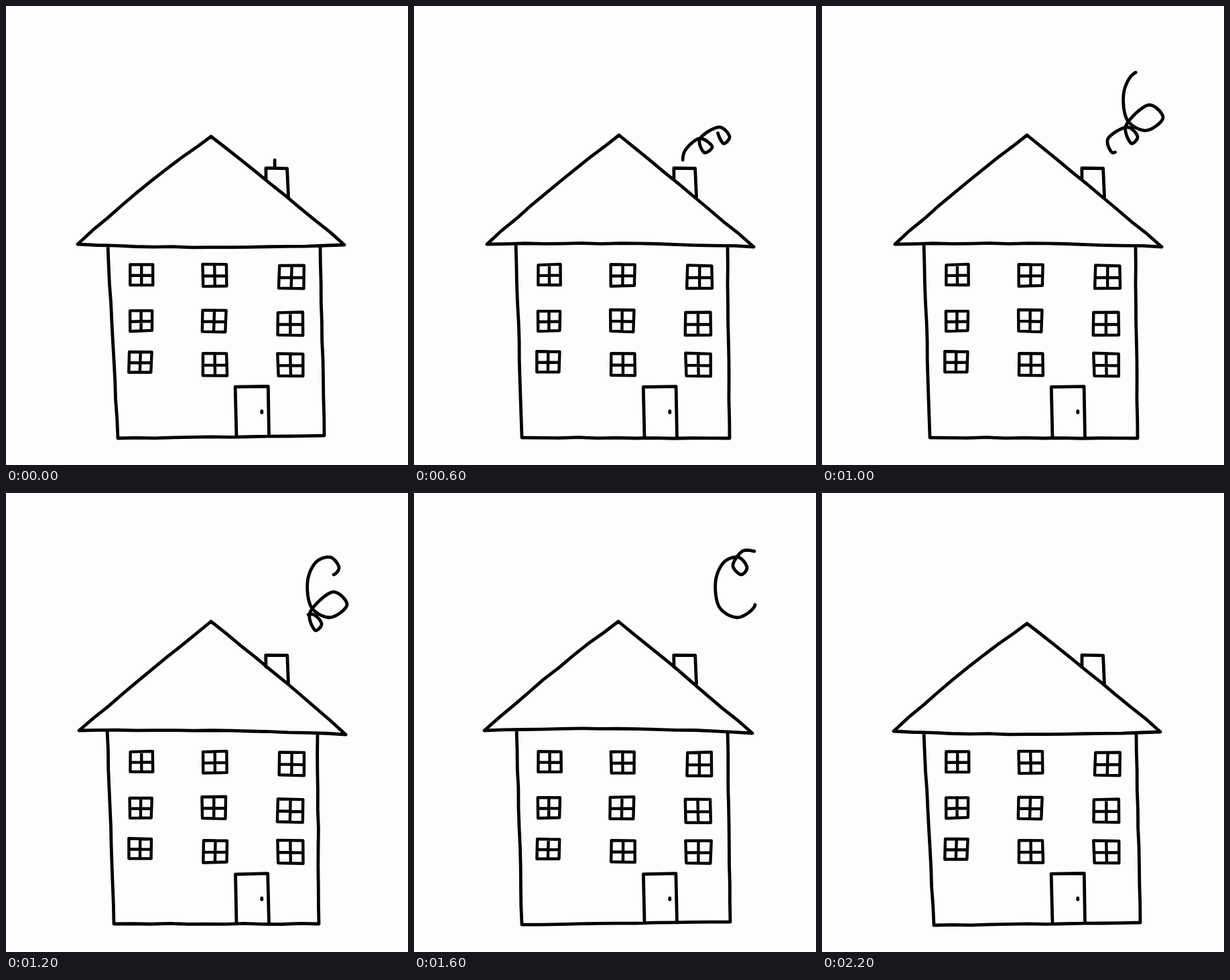
An HTML page that plays this animation: 600x686 px, repeating every 2300 ms.

```html
<!DOCTYPE html>
<html lang="en">
<head>
<meta charset="utf-8">
<title>House with smoke</title>
<style>
  html, body { margin: 0; width: 100%; height: 100%; overflow: hidden; background: #fefcff; }
  svg { display: block; width: 100%; height: 100%; }
  path { fill: none; stroke: #000; stroke-width: 4.8; stroke-linecap: round; stroke-linejoin: round; }
  #windows { stroke-width: 4.4; }
</style>
</head>
<body>
<svg viewBox="0 0 600 686">
  <path id="house"/>
  <path id="windows"/>
  <path id="smoke"/>
</svg>
<script>
// Key points of the four drawings that make the outline boil.
// bows: how far the left slope, right slope and eaves sag at their middle.
const poses = [
  { apex: [306, 195], eaves: [[107, 356], [505, 357]], top: [152, 469], base: [[167, 646], [475, 642]], bows: [-6, -2, 4] },
  { apex: [306, 193], eaves: [[109, 356], [507, 360]], top: [152, 468], base: [[161, 645], [471, 646]], bows: [-4, -1, -3] },
  { apex: [305, 192], eaves: [[105, 355], [505, 359]], top: [153, 468], base: [[161, 645], [472, 641]], bows: [-4, -1, -5] },
  { apex: [306, 192], eaves: [[109, 355], [507, 361]], top: [151, 465], base: [[161, 644], [467, 644]], bows: [-1, -3, -3] }
];

const windowCentres = [
  [202.5, 401.5], [311.5, 402.5], [426, 405],
  [201, 470.5], [310.5, 470.5], [424, 475],
  [200.5, 532], [312, 536], [424.5, 536.5]
];

// Key points of the whole curl of smoke, from the chimney upwards.
const curl = [
  [401, 241], [404, 217], [426, 198], [445, 210], [433, 219], [427, 198],
  [455, 181], [471, 195], [461, 205], [454, 178], [487, 148], [509, 167],
  [484, 186], [456, 171], [450, 133], [462, 104], [484, 96], [497, 111],
  [488, 122], [476, 108], [490, 87], [508, 87]
];

// [step, position along the curl]
const headKeys = [[0, 0.5], [3, 5.55], [7, 11.7], [8, 14], [11, 17.9], [14, 21]];
const tailKeys = [[4, 0], [7, 1.5], [11, 5.85], [14, 11], [17, 15.05], [20, 21]];

const stepCount = 21, heldSteps = [2, 11];
const duration = step => heldSteps.includes(step) ? 200 : 100;
const loop = 100 * (stepCount + heldSteps.length);

const mix = (a, b, t) => a + (b - a) * t;
const mixPoint = (p, q, t) => [mix(p[0], q[0], t), mix(p[1], q[1], t)];
const toPath = points => 'M' + points.map(p => p.map(v => v.toFixed(2)).join(' ')).join('L');

function seededJitter(seed) {
  return size => {
    seed = (seed * 16807) % 2147483647;
    return (seed / 2147483647 * 2 - 1) * size;
  };
}

// A hand-drawn line: slightly unsteady, optionally sagging in the middle.
function handLine(from, to, jitter, bow = 0) {
  const parts = Math.ceil(Math.hypot(to[0] - from[0], to[1] - from[1]) / 30);
  return toPath(Array.from({ length: parts + 1 }, (_, i) => {
    const t = i / parts, shake = i % parts ? 0.6 : 0;
    const [x, y] = mixPoint(from, to, t);
    return [x + jitter(shake), y + jitter(shake) + bow * 4 * t * (1 - t)];
  }));
}

function housePath({ apex, eaves: [left, right], top, base, bows }, jitter) {
  const eaveAt = x => {
    const t = (x - left[0]) / (right[0] - left[0]);
    return [x, mix(left[1], right[1], t) + bows[2] * 4 * t * (1 - t)];
  };
  const baseAt = x => mixPoint(...base, (x - base[0][0]) / (base[1][0] - base[0][0]));
  const near = (x, y) => [x + jitter(0.5), y + jitter(0.5)];
  return [
    handLine(left, apex, jitter, bows[0]),
    handLine(apex, right, jitter, bows[1]),
    handLine(left, right, jitter, bows[2]),
    handLine(eaveAt(top[0]), base[0], jitter),
    handLine(base[0], base[1], jitter),
    handLine(base[1], eaveAt(top[1]), jitter),
    toPath([[388, 260], near(387.5, 242.5), near(420, 242.5), [421.5, 285]]),
    toPath([baseAt(344), near(342.5, 569.5), near(391, 569), baseAt(392.5)]),
    'M381.8 605.3v2.4'
  ].join('');
}

function windowPath([x, y], index, jitter) {
  const column = index % 3, w = 16.5 + column, h = 15 + column;
  const corner = (sx, sy) => [x + sx * w + jitter(0.8), y + sy * h + jitter(0.8)];
  const [a, b, c, d] = [corner(-1, -1), corner(1, -1), corner(1, 1), corner(-1, 1)];
  return toPath([a, b, c, d]) + 'Z' +
    toPath([mixPoint(a, b, 0.5), mixPoint(d, c, 0.5)]) +
    toPath([mixPoint(a, d, 0.53), mixPoint(b, c, 0.53)]);
}

const drawings = poses.map((pose, i) => {
  const jitter = seededJitter(7919 * (i + 1));
  return {
    house: housePath(pose, jitter),
    windows: windowCentres.map((centre, k) => windowPath(centre, k, jitter)).join('')
  };
});

function keyedValue(keys, step) {
  if (step <= keys[0][0]) return keys[0][1];
  const next = keys.findIndex(([s]) => s >= step);
  if (next < 0) return keys[keys.length - 1][1];
  const [s0, v0] = keys[next - 1], [s1, v1] = keys[next];
  return mix(v0, v1, (step - s0) / (s1 - s0));
}

// Catmull-Rom position on the curl.
function curlPoint(u) {
  const last = curl.length - 1;
  const i = Math.min(Math.floor(u), last - 1), t = u - i;
  const at = k => curl[Math.max(0, Math.min(last, k))];
  const [p, q, r, s] = [at(i - 1), at(i), at(i + 1), at(i + 2)];
  return [0, 1].map(k => q[k] + 0.5 * t * (r[k] - p[k] +
    t * (2 * p[k] - 5 * q[k] + 4 * r[k] - s[k] +
    t * (3 * (q[k] - r[k]) + s[k] - p[k]))));
}

function smokePath(step) {
  const tail = keyedValue(tailKeys, step), head = keyedValue(headKeys, step);
  if (tail >= head) return '';
  const count = Math.ceil((head - tail) * 12);
  return toPath(Array.from({ length: count + 1 }, (_, i) => curlPoint(mix(tail, head, i / count))));
}

function stepAt(time) {
  let step = 0;
  while (time >= duration(step)) time -= duration(step++);
  return step;
}

const setPath = (id, d) => document.getElementById(id).setAttribute('d', d);
let shown = -1;

function draw(time) {
  const step = stepAt(time % loop);
  if (step === shown) return;
  shown = step;
  const { house, windows } = drawings[step % drawings.length];
  setPath('house', house);
  setPath('windows', windows);
  setPath('smoke', smokePath(step));
}

const start = performance.now();
function tick() {
  draw(performance.now() - start);
  requestAnimationFrame(tick);
}
tick();
</script>
</body>
</html>
```
